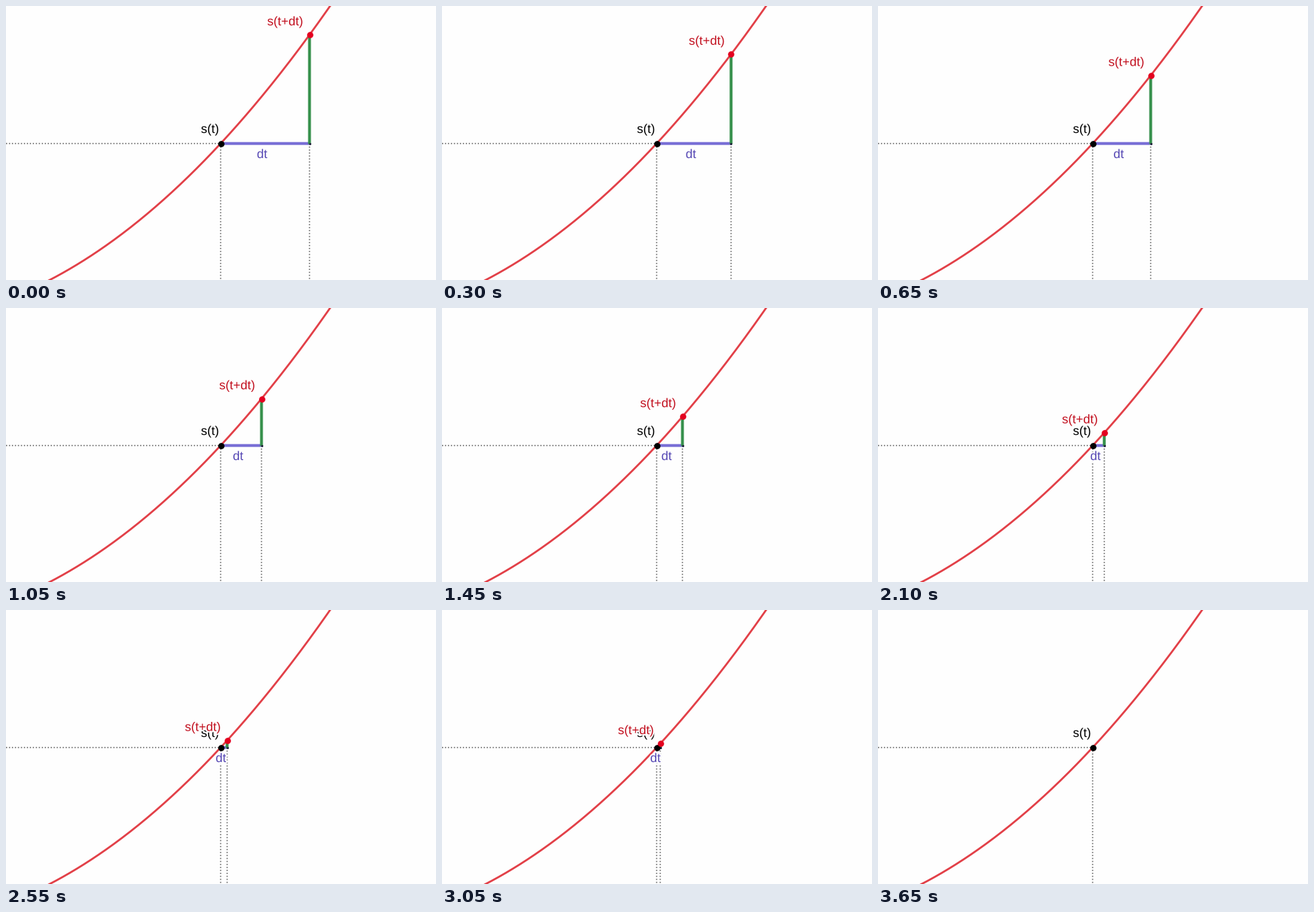
A matplotlib script for the animation above (4650 ms loop, 600 by 382 pixels).

```python
import numpy as np
import matplotlib.pyplot as plt
from matplotlib.animation import FuncAnimation
from matplotlib.patheffects import withStroke

W, H, DPI = 600, 382, 100
STEP_MS, LOOP_MS, LIMIT_MS = 50, 4650, 3650
PX = 72 / DPI
PAPER = "#fefefe"
X0, Y0 = 299.5, 191.7

# Gap between the two points, in pixels, at a few key times.
KEY_T = np.array([0, 650, 1050, 1450, 2100, 3050, 3650.0])
KEY_DT = np.array([124, 81, 57, 36, 16.2, 5, 2.0])
SLOPES = np.gradient(KEY_DT, KEY_T)


def gap(t):
    """Smooth Hermite path of the shrinking dt."""
    i = min(np.searchsorted(KEY_T, t, side="right") - 1, len(KEY_T) - 2)
    span = KEY_T[i + 1] - KEY_T[i]
    u = (t - KEY_T[i]) / span
    ease = u * u * (3 - 2 * u)
    return (KEY_DT[i] * (1 - ease) + KEY_DT[i + 1] * ease
            + span * u * (1 - u) * (SLOPES[i] * (1 - u) - SLOPES[i + 1] * u))


def curve(x):
    h = x - X0
    return Y0 - 1.0768 * h - 0.00117 * h * h


fig = plt.figure(figsize=(W / DPI, H / DPI), dpi=DPI, facecolor=PAPER)
ax = fig.add_axes([0, 0, 1, 1])
ax.set_xlim(0, W)
ax.set_ylim(H, 0)
ax.axis("off")


def line(xs, ys, color, width, z, **style):
    style.setdefault("solid_capstyle", "butt")
    return ax.plot(xs, ys, color=color, lw=width * PX, zorder=z,
                   snap=False, **style)[0]


def dotted(xs, ys):
    return line(xs, ys, "#666666", 1.6, 1, linestyle=(0, (1, 1.6)))


def dot(x, y, color, size, z):
    return ax.plot([x], [y], "o", color=color, ms=size * PX, mew=0,
                   zorder=z, snap=False)[0]


def label(x, y, text, color, z):
    return ax.text(x, y, text, color=color, fontsize=17.5 * PX, zorder=z,
                   family="Liberation Sans", va="baseline", ha="left",
                   path_effects=[withStroke(linewidth=4 * PX, foreground=PAPER)])


xs = np.linspace(40, 470, 300)
line(xs, curve(xs), "#e23f47", 2.7, 2)
dotted([0, X0], [Y0, Y0])
dotted([X0, X0], [Y0, H])
dot(X0, Y0, "#000000", 8.7, 6)
label(272, 177, "s(t)", "#000000", 7)

drop = dotted([X0, X0], [Y0, H])
base = line([X0, X0], [Y0, Y0], "#786ed6", 4, 3)
rise = line([X0, X0], [Y0, Y0], "#36904c", 4, 4)
corner = dot(X0, Y0, "#20203a", 3, 5)
tip = dot(X0, Y0, "#e4001f", 8.7, 8)
dt_text = label(X0, 212, "dt", "#5648b4", 7)
tip_text = label(X0, Y0, "s(t+dt)", "#c2101f", 9)
moving = [drop, base, rise, corner, tip, dt_text, tip_text]


def draw(frame):
    t = frame * STEP_MS
    for artist in moving:
        artist.set_visible(t < LIMIT_MS)
    if t < LIMIT_MS:
        dt = gap(t)
        x = X0 + dt
        y = curve(x)
        drop.set_xdata([x, x])
        base.set_xdata([X0, x])
        rise.set_data([x, x], [y, Y0 + 1])
        corner.set_data([x], [Y0])
        tip.set_data([x], [y])
        dt_text.set_x(X0 + dt / 2 - 11.5)
        tip_text.set_position((x - 59, y - 13.2))
    return moving


anim = FuncAnimation(fig, draw, frames=LOOP_MS // STEP_MS, interval=STEP_MS,
                     repeat=True, repeat_delay=0, blit=False)
plt.show()
```
